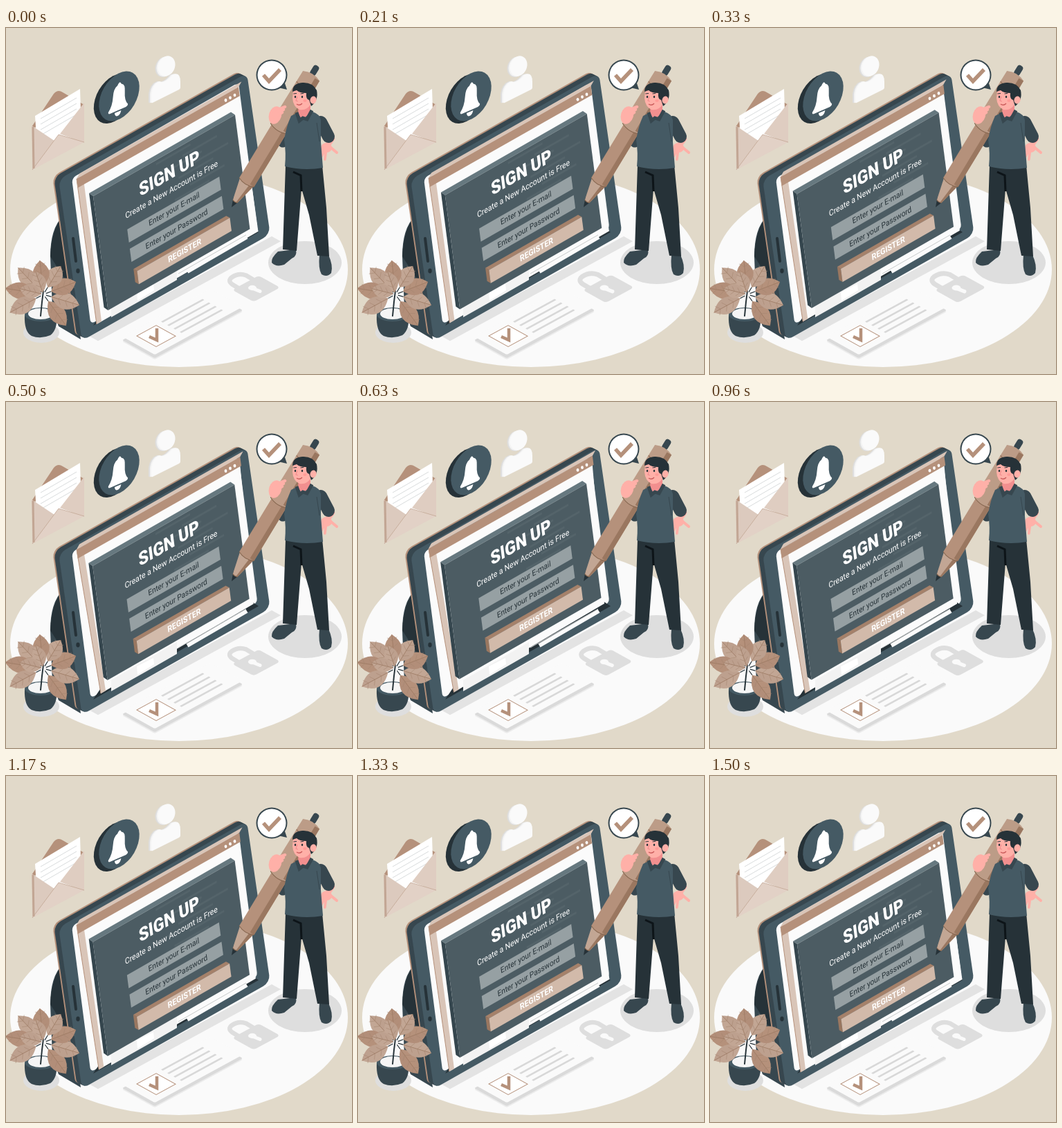
An HTML page with a canvas that plays this animation: 500x500 px, repeating every 1540 ms.

```html
<!DOCTYPE html>
<html lang="en">
<head>
<meta charset="utf-8">
<title>Sign up</title>
<style>
html, body { margin: 0; width: 100%; height: 100%; overflow: hidden; background: #e1d9c9; }
canvas { display: block; width: 500px; height: 500px; }
</style>
</head>
<body>
<canvas id="stage" width="500" height="500"></canvas>
<script>
const ctx = document.getElementById('stage').getContext('2d');
const LOOP = 1540;
// Isometric planes: horizontal axis, then vertical axis
const WALL = [1, -0.573, 0.13, 1];
const FLOOR = [1, -0.545, 1, 0.555];
const C = {
  bg: '#e1d9c9', paper: '#fafafa', slate: '#455a64', dark: '#37474f', ink: '#263238',
  brown: '#b5917b', deep: '#9a7760', tan: '#c2a694', pale: '#d9c5b8', skin: '#ffb0a8',
  blush: '#f28f8f', grey: '#dedede', field: '#96a0a3'
};

function within(x, y, basis, drawPart) {
  ctx.save();
  ctx.transform(...basis, x, y);
  drawPart();
  ctx.restore();
}
function turned(x, y, angle, drawPart) {
  const c = Math.cos(angle), s = Math.sin(angle);
  within(x, y, [c, s, -s, c], drawPart);
}
function trace(points) {
  ctx.beginPath();
  for (let i = 0; i < points.length; i += 2) ctx.lineTo(points[i], points[i + 1]);
}
function poly(color, ...points) {
  trace(points);
  ctx.fillStyle = color;
  ctx.fill();
}
function line(color, width, ...points) {
  trace(points);
  ctx.strokeStyle = color;
  ctx.lineWidth = width;
  ctx.stroke();
}
function limb(color, width, ...points) {
  ctx.lineCap = ctx.lineJoin = 'round';
  line(color, width, ...points);
  ctx.lineCap = 'butt';
  ctx.lineJoin = 'miter';
}
function oval(color, x, y, rx, ry = rx, turn = 0) {
  ctx.beginPath();
  ctx.ellipse(x, y, rx, ry, turn, 0, Math.PI * 2);
  ctx.fillStyle = color;
  ctx.fill();
}
function shape(color, d) {
  ctx.fillStyle = color;
  ctx.fill(new Path2D(d));
}
function curve(color, width, d) {
  ctx.strokeStyle = color;
  ctx.lineWidth = width;
  ctx.stroke(new Path2D(d));
}
function rect(color, x, y, w, h, radius = 0) {
  ctx.beginPath();
  ctx.roundRect(x, y, w, h, radius);
  ctx.fillStyle = color;
  ctx.fill();
}
// A box whose back face lies up and to the left of its front
function slab(x, y, w, h, dx, dy, front, top, side) {
  poly(top, x, y, x + w, y, x + w - dx, y - dy, x - dx, y - dy);
  poly(side, x, y, x, y + h, x - dx, y + h - dy, x - dx, y - dy);
  rect(front, x, y, w, h);
}
function label(text, y, size, weight = 400, color = '#fff') {
  within(106.5, y, [0.866, 0, 0, 1], () => {
    ctx.font = `${weight} ${size}px Roboto, Inter, sans-serif`;
    ctx.textAlign = 'center';
    ctx.textBaseline = 'middle';
    ctx.fillStyle = color;
    ctx.fillText(text, 0, 0);
  });
}

function drawEnvelope() {
  shape(C.brown, 'M37 143L69 95Q75 88 82 93L113 111V150Z');
  poly('#fff', 42, 127, 107, 88, 109, 150, 75, 172, 44, 160);
  for (let i = 0; i < 4; i++) line('#d9dcdd', 1, 50, 131 + i * 8, 102, 101 + i * 8);
  poly('#dccabe', 37, 141, 70, 163, 38, 205);
  poly('#dfcdc1', 113, 108, 113, 166, 78, 153);
  poly('#e2d1c6', 38, 205, 76, 154, 113, 165);
  line(C.tan, 0.8, 38, 205, 76, 154, 113, 165);
  line(C.tan, 3, 39, 143, 40, 203);
}

function drawBell() {
  oval(C.ink, 156, 102, 25, 39, 0.53);
  oval(C.slate, 163.5, 98.5, 25, 39, 0.53);
  within(163, 99, [0.95, -0.42, -0.06, 1], () => {
    shape('#fff', 'M-15 17Q-9 10 -9 -3Q-9 -15 -3 -17Q0 -24 3 -17Q9 -15 9 -3Q9 10 15 17Q15 20 12 20H-12Q-15 20 -15 17Z');
    shape('#fff', 'M-5 22H5Q4 28 0 28Q-4 28 -5 22Z');
  });
}

function drawUser() {
  for (const [color, shift] of [[C.grey, -4], ['#f3f3f3', -2], [C.paper, 0]]) {
    oval(color, 232 + shift, 55 - shift / 3, 12, 15, 0.4);
    within(230 + shift, 97, [1, -0.5, 0, 1], () =>
      shape(color, 'M-20 0V-12Q-18 -25 -8 -24Q0 -16 10 -24Q22 -24 22 -8V0Q22 2 20 2H-18Q-20 2 -20 0Z'));
  }
}

function drawBubble() {
  poly(C.dark, 393, 86, 406, 89, 402, 77);
  oval(C.dark, 384, 68, 22.5);
  oval('#fff', 384, 68, 20.5);
  line(C.brown, 5.5, 372, 68, 380, 77, 396, 60);
}

function drawCard() {
  for (const [drop, color] of [[7, '#ebebeb'], [5, '#dadada'], [0, C.paper]])
    within(168, 446 + drop, FLOOR, () => rect(color, 0, 0, 127, 47, 2));
  within(168, 446, FLOOR, () => {
    rect(C.brown, 11, 9, 29, 29);
    rect('#fff', 12, 10, 27, 27);
    for (let i = 0; i < 4; i++) rect('#d8d8d8', 48, 8 + i * 9, 60, 2.6);
  });
  line(C.brown, 4.5, 207, 446, 218, 451, 218, 434);
}

function drawLock(scale) {
  within(357, 375.5, [scale, 0, 0, scale], () => {
    curve(C.grey, 6.5, 'M-20 1L-30 -5Q-37 -10 -31 -15Q-21 -22 -10 -18L5 -9');
    within(-30, 3, FLOOR, () => rect(C.grey, 0, 0, 38, 31, 4));
    oval(C.paper, -1, 0, 6, 3.7);
    limb(C.paper, 5, 0, 1, 10, 5);
  });
}

function drawTablet() {
  within(120, 445, FLOOR, () => rect('#e3e3e3', 0, 0, 264, 13));
  shape(C.dark, 'M82 272Q64 290 64 330L67 405L76 431L108 450Z');
  shape(C.ink, 'M82 272Q66 290 64 330L90 370Z');
  const body = [1, -0.566, 0.145, 1];
  for (let d = 9; d >= 0; d--) {
    const color = d > 7 ? C.brown : d ? C.dark : C.slate;
    within(76 - d, 219 - d / 2, body, () => rect(color, 0, 0, 272, 233, 10));
  }
  within(95, 217, WALL, () => rect('#fbfbfb', 0, 0, 241, 211, 6));
  limb(C.ink, 4, 97, 304, 101, 337);
  oval(C.ink, 104, 351, 2.7, 3.4);
}

function drawWindow(k) {
  const top = 218 - 6.5 * k;
  const left = 131 + 8 * k, bottom = 428 - 9 * k;
  const right = 364.5 - 9 * k, low = 294 - 3 * k;
  poly(C.ink, 126, 430, 365, 295, 350, 285, 140, 409);
  poly('#fbfbfb', 102, top, 335 + 3 * k, top - 132, right, low, left, bottom);
  poly(C.pale, 102, top, 112, top, left + 7, bottom - 4, left, bottom);
  line(C.brown, 1, 102, top, left, bottom);
  within(102, top, [1, -0.567, 0.13, 1], () =>
    slab(0, 0, 234 + 3 * k, 13, -5, 5, C.brown, C.pale, C.pale));
  for (let i = 0; i < 3; i++) oval('#fff', 317.5 + i * 6.5, top - 113.5 - i * 3.7, 1.9, 2.4);
}

function drawPageFoot() {
  poly('#f2f2f2', 152, 402, 247, 347, 247, 364, 214, 383, 152, 418);
  poly('#fff', 189, 382, 213, 370, 214, 379, 190, 394);
  line('#fbfbfb', 6, 262, 352, 348, 302);
  line('#c9cccc', 1, 249, 355, 347, 299);
}

function drawPanel(k) {
  within(126 - k, 243 - 8 * k, WALL, () => {
    slab(0, 0, 205, 165, 5, 7, '#4c5c63', '#66787f', '#35464e');
    for (let i = 0; i < 8; i++) rect('#ffffff0c', 90 + (i * 37) % 60, 4 + i * 9, 50, 3);
    label('SIGN UP', 29, 26, 900);
    label('Create a New Account is Free', 52, 11.8);
    ['Enter your E-mail', 'Enter your Password'].forEach((hint, i) => {
      rect(C.field, 40, 71 + i * 28, 133, 19);
      label(hint, 80 + i * 29, 11.3, 400, C.ink);
    });
    slab(46, 134.5, 134, 19, 4.5, 5.5, '#d2baaa', '#a5816a', C.deep);
    within(7, 0, [1, 0, 0, 1], () => label('REGISTER', 144, 12, 700));
  });
}

// One tapered length of the pen, shaded along its right side
function barrel(from, to, r1, r2, color) {
  shape(color, `M${-r1} ${-from}L${-r2} ${-to}Q0 ${-to - r2 / 2} ${r2} ${-to}L${r1} ${-from}Q0 ${r1 / 2 - from} ${-r1} ${-from}Z`);
  poly(C.deep, r1 * 0.45, -from, r1, -from, r2, -to, r2 * 0.45, -to);
  curve('#85664f', 1, `M${-r1} ${-from}Q0 ${r1 / 2 - from} ${r1} ${-from}`);
}

function drawPen() {
  turned(326, 259, 0.545, () => {
    poly(C.ink, 0, 0, 5, -13, -5, -13);
    rect(C.dark, -4.5, -239, 9, 16, 4);
    barrel(10, 44, 4, 12, C.tan);
    barrel(42, 136, 12.5, 12.5, C.brown);
    barrel(133, 222, 15, 14, '#bc9c87');
    curve(C.deep, 1.5, 'M-14 -204Q0 -198 14 -204');
  });
}

function drawHand(x, y, reach) {
  oval(C.skin, x, y, 8, 7);
  for (let i = 0; i < 4; i++) {
    const a = 2.9 - i * 0.4;
    limb(C.skin, 3.8, x, y, x + reach * Math.cos(a), y + reach * Math.sin(a));
  }
}

function drawMan() {
  // legs and shoes
  shape(C.dark, 'M393 323Q383 332 384 339Q390 346 402 342L413 333Q421 330 419 320Z');
  shape(C.dark, 'M453 328Q451 348 456 356Q464 361 470 354Q473 343 466 328Z');
  poly(C.ink, 404, 198, 457, 198, 463, 260, 467, 330, 450, 329, 438, 270, 427, 232, 420, 322, 400, 320);
  line('#0d1418', 3, 415, 208, 426, 213, 427, 236);
  // far arm, torso, near arm
  limb(C.skin, 8, 471, 160, 463, 172);
  drawHand(463, 173, 17);
  limb(C.skin, 4, 466, 170, 478, 180);
  limb(C.dark, 18, 455, 136, 466, 157);
  shape(C.slate, 'M412 127L424 121L443 121Q453 124 455 133L455 165L458 202Q431 207 403 200Q405 180 402 162Q405 142 412 127Z');
  line(C.dark, 1, 449, 137, 453, 164);
  oval(C.skin, 389, 126, 9, 13, 0.3);
  for (let i = 0; i < 3; i++) limb(C.skin, 4.5, 387, 120 + i * 4, 403 - i * 2, 114 + i * 4);
  // neck and collar
  poly(C.blush, 423, 108, 440, 108, 440, 122, 428, 133, 422, 123);
  line(C.dark, 5, 420, 122, 424, 134, 429, 130, 435, 132, 442, 119);
  // head
  shape(C.skin, 'M415 92Q422 84 440 91L441 109Q435 120 424 118Q415 114 414 101Z');
  shape(C.ink, 'M414 92Q414 80 428 79Q443 78 449 90Q452 104 441 113L438 104Q433 103 434 94Q424 94 420 90Z');
  oval(C.skin, 444, 104, 4.5, 5.5, 0.3);
  for (const x of [418, 428]) {
    oval(C.ink, x, 99.5, 1.2, 1.8);
    line(C.ink, 1, x - 2.5, 95, x + 2, 94.5);
  }
  line(C.blush, 1.2, 421, 99, 419, 105, 422, 106);
  curve('#ca5c5c', 1.4, 'M420 110Q424 113 428 109');
  oval('#ff9c98', 432, 105, 2.7, 2);
}

function leaf(angle, distance, length, width, color) {
  turned(54, 385, angle, () => {
    const end = distance + length, mid = distance + length / 2;
    const edge = side => `Q${mid} ${side * width * 2} ${end} 0`;
    line(C.ink, 1.2, 4, 0, distance, 0);
    shape(color, `M${distance} 0${edge(-1)}Q${mid} ${width * 2} ${distance} 0Z`);
    shape('#9c7c6822', `M${distance} 0${edge(1)}Z`);
    line(C.deep, 0.7, distance, 0, end, 0);
    for (let i = 1; i < 4; i++) {
      const x = distance + length * i / 4;
      line('#a3846f', 0.5, x + 5, -width * 0.6, x, 0, x + 5, width * 0.6);
    }
  });
}

function drawPlant() {
  oval(C.grey, 51, 440, 26, 15);
  shape(C.dark, 'M27 415Q26 439 37 445Q50 450 64 444Q75 436 73 414Z');
  oval(C.slate, 50, 414, 23, 10);
  oval('#f5f5f5', 50, 413, 18, 8);
  limb(C.ink, 2, 50, 416, 52, 396, 54, 380);
  for (let i = 0; i < 8; i++)
    leaf((54 - 37.5 * i) * Math.PI / 180, 12, 40 + 4 * Math.cos(i), 12, i % 2 ? C.tan : C.brown);
  for (const angle of [-1.9, -2.9]) leaf(angle, 3, 32, 10, C.tan);
}

function draw(time) {
  const t = time % LOOP;
  const wave = period => 0.5 - 0.5 * Math.cos(2 * Math.PI * t / period);
  const float = t < 1500 ? wave(1500) : 0;
  const pulse = t < 1080 ? wave(540) : 0;
  ctx.fillStyle = C.bg;
  ctx.fillRect(0, 0, 500, 500);
  oval(C.paper, 250, 349, 244, 141);
  drawEnvelope();
  drawBell();
  drawUser();
  drawBubble();
  drawTablet();
  drawWindow(float);
  drawPageFoot();
  drawPanel(float);
  drawCard();
  drawLock(1 + 0.08 * pulse);
  drawPlant();
  oval(C.grey, 432, 339, 53, 31);
  limb(C.dark, 15, 413, 140, 400, 165);
  drawPen();
  drawMan();
}

let start;
function tick(now) {
  start ??= now;
  draw(now - start);
  requestAnimationFrame(tick);
}
draw(0);
requestAnimationFrame(tick);
</script>
</body>
</html>
```
